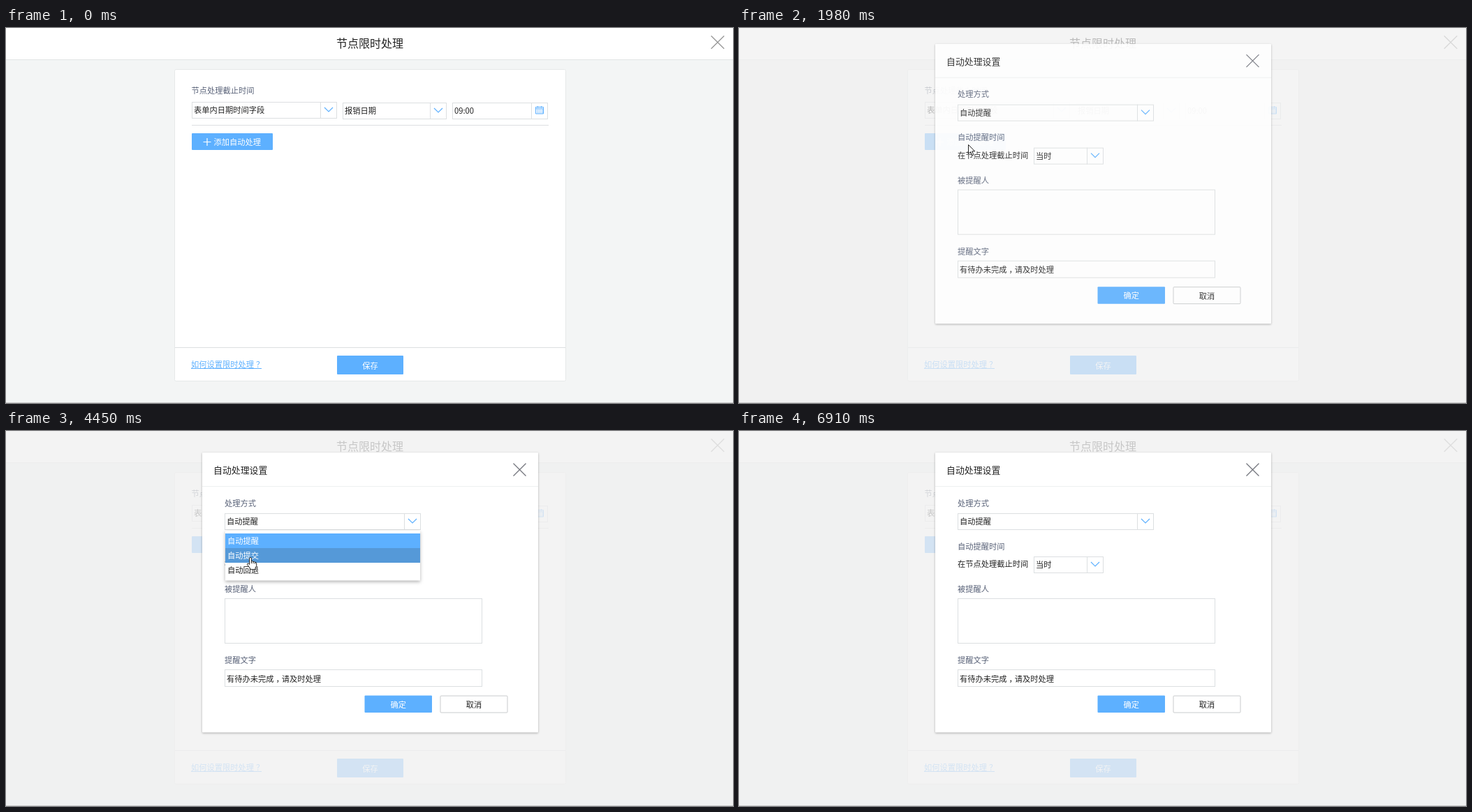
Recreate the animation shown at these times as an HTML page. Size 1041 by 538 pixels, loop 7.71 s.

```html
<!DOCTYPE html>
<html lang="zh-CN">
<head>
<meta charset="utf-8">
<title>节点限时处理</title>
<style>
  html, body { margin: 0; width: 100%; height: 100%; overflow: hidden; background: #f3f5f5; }
  svg { display: block; width: 1041px; height: 538px; cursor: default; }
  text { font: 11.25px "Noto Sans CJK SC", "Noto Sans CJK", sans-serif; fill: #222; }
  .label { fill: #596278; }
  .white { fill: #fff; }
  .mid { text-anchor: middle; }
  .title { font-size: 16px; }
  .head { font-size: 12.9px; }
  .link { fill: #5db0ff; }
  .line { fill: none; stroke: #dcdfe1; }
  .mark { fill: none; stroke: #5db0ff; stroke-width: 1.2; }
  .blue { fill: #5db0ff; }
  #modalBox { filter: drop-shadow(0 1px 1.5px rgba(0, 0, 0, .3)); }
  #menuBox { filter: drop-shadow(0 2px 2.5px rgba(0, 0, 0, .3)); }
</style>
</head>
<body>
<svg id="stage" viewBox="0 0 1041 538"></svg>
<script>
const LOOP = 7710, STEP = 79.5, FIRST = 150;

// Full-width punctuation sits in the middle of its cell.
const centred = s => s.replace(/[，？]/g, '<tspan dx="3">$&</tspan><tspan dx="-3">') +
  (/[，？]/.test(s) ? "</tspan>" : "");

// Markup helpers; text is placed by the vertical centre of its glyphs.
const text = (x, cy, s, cls = "", size = 11.25) =>
  `<text x="${x}" y="${cy + size * .38}" class="${cls}">${centred(s)}</text>`;
const rect = (x, y, w, h, attrs) =>
  `<rect x="${x}" y="${y}" width="${w}" height="${h}" ${attrs}/>`;
const frame = (x, y, w, h, fill = "#fff", stroke = "#dcdfe1") =>
  rect(x + .5, y + .5, w - 1, h - 1, `fill="${fill}" stroke="${stroke}"`);
const path = (d, cls = "line", attrs = "") => `<path d="${d}" class="${cls}" ${attrs}/>`;
const cross = (x, y, r, color) =>
  path(`M${x - r} ${y - r}L${x + r} ${y + r}M${x + r} ${y - r}L${x - r} ${y + r}`, "", `stroke="${color}" stroke-width="1.3"`);
const button = (x, y, w, h, label) =>
  rect(x, y, w, h, 'rx="1" class="blue"') + text(x + w / 2, y + h / 2 + .8, label, "white mid");

function field(x, y, w, h, value) {
  return frame(x, y, w, h) + path(`M${x + w - 23.5} ${y}v${h}`) +
    text(x + 3, y + h / 2 + .2, value);
}
function select(x, y, w, h, value) {
  return field(x, y, w, h, value) +
    path(`M${x + w - 18} ${y + 8}l6 6l6 -6`, "mark");
}

function calendar(x, y) {
  let dots = "";
  for (let r = 0; r < 3; r++)
    for (let c = 0; c < 4; c++) dots += `M${x + 2.2 + c * 2.5} ${y + 5.5 + r * 2}h1.3`;
  return path(`M${x + .5} ${y + 1.5}h11v9.5h-11zM${x + .5} ${y + 3.7}h11M${x + 3.5} ${y}v2.5M${x + 8.5} ${y}v2.5${dots}`, "mark", 'style="stroke-width:1"');
}

const page =
  rect(0, 0, 1041, 538, 'fill="#f3f5f5"') +
  rect(0, 0, 1041, 45, 'fill="#fff"') +
  path("M0 45.5H1041", "line", 'style="stroke:#e2e4e4"') +
  text(521, 21.5, "节点限时处理", "title mid", 16) +
  cross(1019, 20.5, 9.3, "#999") +
  rect(241.5, 59.5, 560, 447, 'rx="2" fill="#fff" stroke="#e6e9e9"') +
  text(265.5, 90, "节点处理截止时间", "label") +
  select(266, 106, 208, 24, "表单内日期时间字段") +
  select(482, 107, 149, 24, "报销日期") +
  field(639, 107, 137, 24, "09:00") + calendar(758, 112) +
  path("M266 139.5H777") +
  `<g id="add">${rect(266, 151, 116, 24, 'rx="1" class="blue"')}` +
  path("M282.5 163.5h11M288 158v11", "", 'stroke="#fff" stroke-width="1.2"') +
  text(297.5, 163.5, "添加自动处理", "white") + "</g>" +
  path("M242 458.5H801") +
  text(265, 483, "如何设置限时处理？", "link") +
  path("M265 488.5H366", "mark", 'style="stroke-width:1"') +
  button(474, 470, 95, 27, "保存");

const ROW_TOP = 147.5, ROW = 20.8;
const options = ["自动提醒", "自动提交", "自动回退"];
const menu = `<g id="menu">${rect(314, 143, 279, 71.5, 'id="menuBox" fill="#fff"')}` +
  options.map((s, i) =>
    rect(314, Math.floor(ROW_TOP + i * ROW), 279, 21, 'class="row"') +
    text(317, 158.2 + i * ROW, s, "option")).join("") + "</g>";

const modal = `<g id="modal">` +
  rect(281, 31, 481, 401.5, 'id="modalBox" rx="1" fill="#fff"') +
  text(297, 56, "自动处理设置", "head", 12.9) +
  cross(735.5, 55.5, 9, "#74767e") +
  path("M281 79.5H762", "line", 'style="stroke:#eef0f0"') +
  text(313, 103.5, "处理方式", "label") +
  select(313, 118, 281, 24, "自动提醒") +
  text(313, 165.3, "自动提醒时间", "label") +
  text(313, 191, "在节点处理截止时间") +
  select(422, 180, 100, 24, "当时") +
  `<g id="people">${text(313, 227, "被提醒人", "label")}${frame(313, 240, 369, 65)}</g>` +
  `<g id="message">${text(313, 329, "提醒文字", "label")}${frame(313, 342, 369, 25)}` +
  text(316, 355.3, "有待办未完成，请及时处理") + "</g>" +
  button(513.5, 379.5, 96.5, 24.5, "确定") +
  rect(622, 380, 96, 24, 'rx="1" fill="#fff" stroke="#c9cbcd"') +
  text(670, 393, "取消", "mid") + menu + "</g>";

const cursor = `<g id="cursor" stroke="#222" fill="#fff" stroke-linejoin="round">` +
  `<path id="arrow" d="M.5 .5V13.5L3.6 10.7L5.8 15.8L7.9 14.9L5.7 9.9H9.7Z"/>` +
  `<g id="hand"><path d="M-1.4 10.5V1.2Q0 -.6 1.4 1.2V6Q3 4.8 4 6.6Q5.5 5.6 6.5 7.3Q8.5 6.6 8.7 9V12.5L7 15.5V17.7H-.5V16L-4.6 10.6Q-4.8 8.4 -2.8 9.2Z"/>` +
  `<path d="M1.4 6v3M4 6.6v2.6M6.5 7.3v2.2" fill="none"/></g></g>`;

document.getElementById("stage").innerHTML = page +
  rect(0, 0, 1041, 537, 'id="veil" fill="#f0f0f0"') +
  path("M0 537.5H1041", "line", 'style="stroke:#cbcccc"') +
  `<circle id="spinner" cx="521" cy="67" r="14" fill="none" stroke="#eee" stroke-width="1.5"/>` +
  modal + cursor;

const el = {};
for (const node of document.querySelectorAll("[id]")) el[node.id] = node;
const rows = [...document.querySelectorAll(".row")];
const labels = [...document.querySelectorAll(".option")];

// Rows: time, then the values at that time.
const cursorPath = [
  [150, 590, 400], [860, 334, 166], [950, 334, 166], [1105, 328, 167], [2140, 328, 167],
  [2375, 430, 137], [2535, 437, 135], [3110, 437, 135], [3405, 348, 162],
  [3880, 349, 166], [4285, 350, 177], [4440, 350, 181], [4840, 352, 202],
  [5150, 356, 203], [5710, 750, 200], [6505, 750, 200], [6830, 899, 491]
];
const modalPath = [
  [1740, -70, .035, .11], [1820, -54, .3, .4], [1900, -26, .65, .7],
  [1980, -8, .9, .92], [2055, 0, 1, 1]
];

function sample(table, t) {
  if (t <= table[0][0]) return table[0].slice(1);
  for (let i = 1; i < table.length; i++) {
    const a = table[i - 1], b = table[i];
    if (t < b[0]) {
      const k = (t - a[0]) / (b[0] - a[0]);
      return a.slice(1).map((v, j) => v + (b[j + 1] - v) * k);
    }
  }
  return table[table.length - 1].slice(1);
}

const show = (node, on) => { node.style.display = on ? "" : "none"; };
const within = (t, a, b) => t >= a && t < b;

function draw(t) {
  const q = FIRST + Math.floor((t - FIRST + 10) / STEP) * STEP;
  const [x, y] = sample(cursorPath, q);
  const [dy, alpha, veil] = sample(modalPath, q);
  const open = t >= 1740;
  const early = t < 1830;

  show(el.modal, open);
  show(el.veil, open);
  show(el.spinner, open && early);
  show(el.people, !early);
  el.modal.setAttribute("transform", `translate(0 ${dy})`);
  el.modal.style.opacity = alpha;
  el.veil.style.opacity = veil * .8;
  el.message.setAttribute("transform", `translate(0 ${early ? -71 : 0})`);

  const onAdd = t < 1830 && x > 266 && x < 382 && y > 151 && y < 175;
  el.add.firstChild.style.opacity = onAdd ? .8 : 1;

  const menuOpen = within(t, 2780, 6430);
  show(el.menu, menuOpen);
  el.menu.style.opacity = t < 2860 || t >= 6350 ? .5 : 1;
  const overMenu = menuOpen && x > 314 && x < 593;
  const hot = overMenu ? Math.floor((y - ROW_TOP) / ROW) : -1;
  rows.forEach((row, i) => {
    row.style.fill = i === hot ? "#5599d8" : i === 0 ? "#5db0ff" : "#fff";
    labels[i].style.fill = i === hot || i === 0 ? "#fff" : "#222";
  });

  const onSelect = t >= 2220 && x > 313 && x < 594 && y > 118 && y < 142;
  const hand = (onAdd && !open) || onSelect || hot >= 0;
  show(el.cursor, within(t, 150, 6910));
  show(el.hand, hand);
  show(el.arrow, !hand);
  el.cursor.setAttribute("transform", `translate(${Math.round(x)} ${Math.round(y)})`);
}

const start = performance.now();
function tick() {
  draw((performance.now() - start) % LOOP);
  requestAnimationFrame(tick);
}
tick();
</script>
</body>
</html>
```
